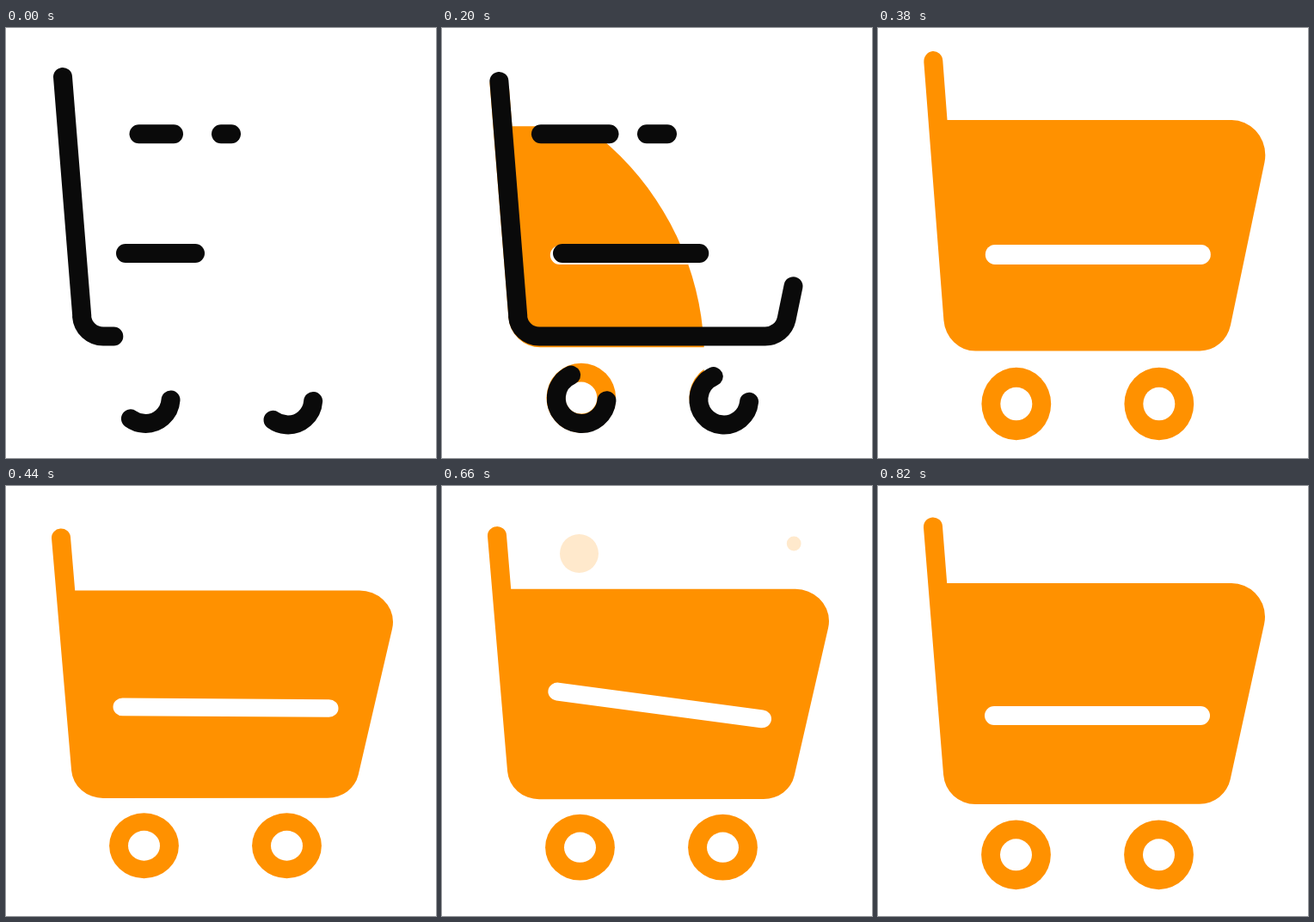
These frames come from a looping animation (500 px wide and 500 px high, 840 ms). An HTML page with a canvas:

```html
<!DOCTYPE html>
<html lang="en">
<head>
<meta charset="utf-8">
<title>Shopping cart</title>
<style>
  html, body { margin: 0; width: 100%; height: 100%; overflow: hidden; background: #fff; }
  canvas { display: block; width: 500px; height: 500px; }
</style>
</head>
<body>
<canvas id="stage" width="500" height="500"></canvas>
<script>
const ctx = document.getElementById('stage').getContext('2d');
const ORANGE = '#ff9100', INK = '#0a0a0a', WHITE = '#fff';
const LOOP = 840, STEP = 20, OUTLINE_END = 340, MID_Y = 253;
const rad = deg => deg * Math.PI / 180;

// Eased value between [time, value] stops.
function track(t, stops) {
  if (t <= stops[0][0]) return stops[0][1];
  for (let i = 1; i < stops.length; i++) {
    const [t0, v0] = stops[i - 1], [t1, v1] = stops[i];
    if (t <= t1) return v0 + (v1 - v0) * (1 - Math.cos(Math.PI * (t - t0) / (t1 - t0))) / 2;
  }
  return stops[stops.length - 1][1];
}

function disc(x, y, r, color) {
  ctx.fillStyle = color;
  ctx.beginPath();
  ctx.arc(x, y, r, 0, 2 * Math.PI);
  ctx.fill();
}

function line(x0, y0, x1, y1, color) {
  ctx.strokeStyle = color;
  ctx.beginPath();
  ctx.moveTo(x0, y0);
  ctx.lineTo(x1, y1);
  ctx.stroke();
}

function drawBody(top) {
  const x = 64 + (top - 47.5) * 0.08;
  ctx.fillStyle = ORANGE;
  ctx.beginPath();
  ctx.moveTo(x - 11, top + 0.9);
  ctx.arc(x, top, 11, rad(175.4), rad(355.4));
  ctx.lineTo(80.2, 113);
  ctx.arc(411, 152, 39, rad(-90), rad(12.5));
  ctx.arc(374, 333.3, 36.5, rad(12.5), rad(90));
  ctx.arc(113, 333, 37, rad(90), rad(175.4));
  ctx.closePath();
  ctx.fill();
}

function drawSlot(t) {
  const x = track(t, [[440, 255.5], [560, 254.7], [660, 253.2], [760, 255]]);
  const y = track(t, [[340, 262.7], [400, 262.7], [440, 258], [560, 222.6], [660, 255], [740, 267]]);
  const tilt = track(t, [[400, 0], [440, 0.4], [560, -4.25], [660, 8], [760, 0]]);
  ctx.save();
  ctx.translate(x, y);
  ctx.rotate(rad(tilt));
  line(-120, 0, 120, 0, WHITE);
  ctx.restore();
}

function drawCart(t) {
  const settle = track(t, [[340, 1.3], [400, 0]]);
  const stretch = track(t, [[340, 1], [380, 1.045], [440, 0.94], [560, 0.954], [660, 0.951], [800, 1]]);
  ctx.save();
  if (t < OUTLINE_END) {
    const reveal = 334 + (t - 200) * 2.9;
    ctx.beginPath();
    ctx.arc(-29, 385, Math.max(0, reveal), 0, 2 * Math.PI);
    ctx.clip();
  }
  ctx.translate(settle, MID_Y + settle);
  ctx.scale(1, stretch);
  ctx.translate(0, -MID_Y);
  drawBody(track(t, [[330, 63], [370, 47.5]]));
  drawSlot(t);
  for (const x of [160.5, 326.5]) {
    disc(x, 428.8, 40.4, ORANGE);
    disc(x, 428.8, 18.5, WHITE);
  }
  ctx.restore();
}

const frame = new Path2D();
frame.moveTo(65.2, 47);
frame.lineTo(88.3, 335.5);
frame.arc(113, 333.5, 25, rad(175.4), rad(90), true);
frame.arc(375.7, 333, 25.5, rad(90), rad(12.6), true);
frame.arc(410.8, 151, 28, rad(12.6), rad(-90), true);
frame.lineTo(262, 123.3);

function drawOutline(t) {
  const grow = Math.min(2.02, 0.00357 * t + 7.14e-6 * t * t);
  const start = 10 + 5 * grow, end = 339 + 324 * grow;
  ctx.strokeStyle = INK;
  ctx.setLineDash([end - start, 2000]);
  ctx.lineDashOffset = -start;
  ctx.stroke(frame);
  ctx.setLineDash([]);

  line(154.5 - 39.6 * grow, 123.3, 195 - 0.5 * grow, 123.3, INK);
  line(250 - 12 * grow, 123.3, 262, 123.3, INK);
  line(139 + grow, 262, 220 + 79.3 * grow, 262, INK);
  for (const [x, y] of [[162.2, 430.5], [327.8, 432]]) {
    ctx.beginPath();
    ctx.arc(x, y, 29.4, rad(4 + 1.5 * grow), rad(126 + 120 * grow));
    ctx.stroke();
  }
}

function drawBubbles(t) {
  const size = track(t, [[580, 0], [660, 1], [760, 0]]);
  ctx.globalAlpha = 0.2;
  disc(159.5, 78.5, 22.5 * size, ORANGE);
  disc(409.2, 67, 8.4 * size, ORANGE);
  ctx.globalAlpha = 1;
}

function draw(t) {
  ctx.fillStyle = WHITE;
  ctx.fillRect(0, 0, 500, 500);
  ctx.lineWidth = 22;
  ctx.lineCap = ctx.lineJoin = 'round';
  drawBubbles(t);
  drawCart(t);
  if (t < OUTLINE_END) drawOutline(t);
}

const begin = performance.now();
function tick() {
  const t = (performance.now() - begin) % LOOP;
  draw(Math.floor(t / STEP) * STEP);
  requestAnimationFrame(tick);
}
tick();
</script>
</body>
</html>
```
